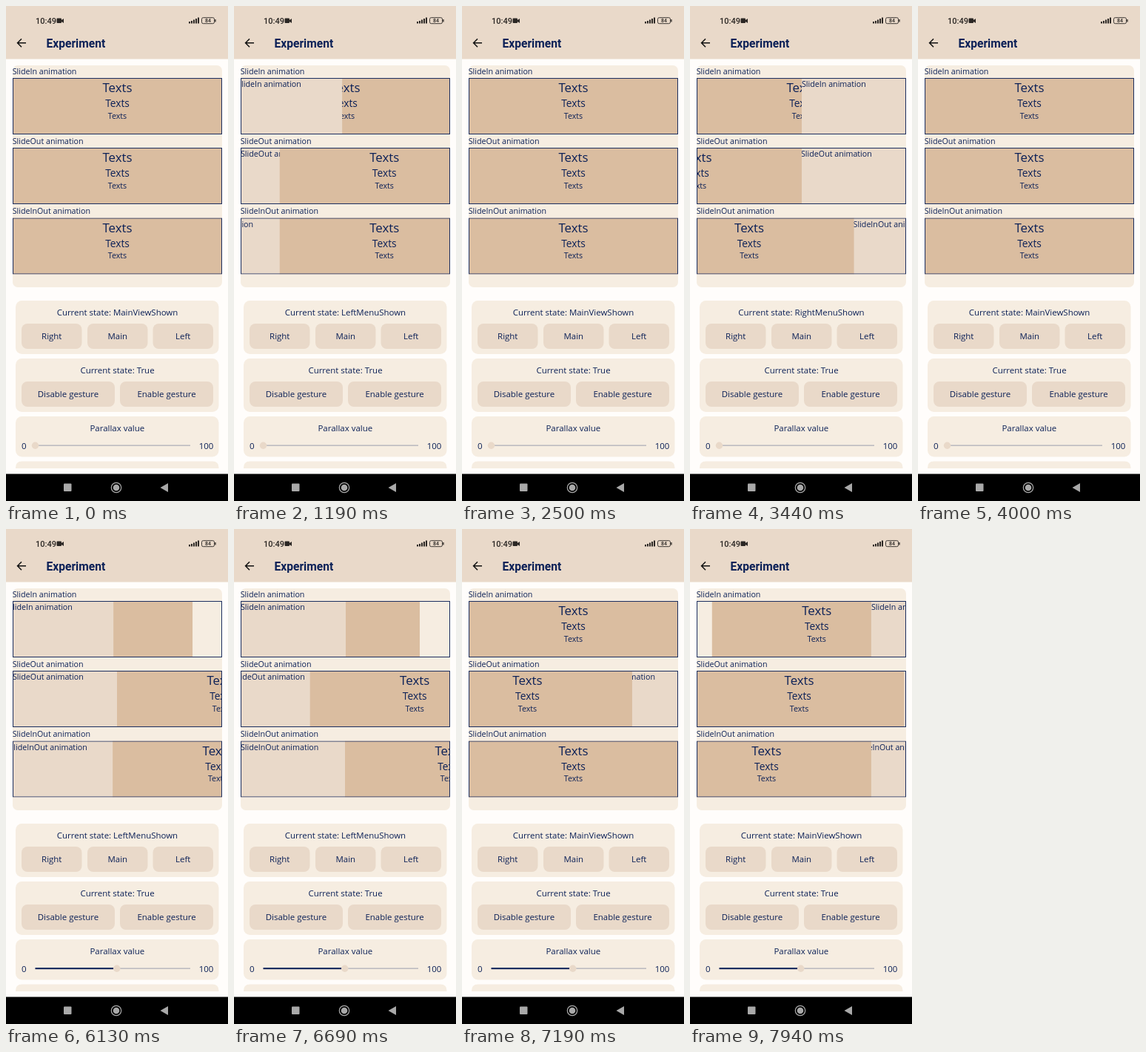
These frames come from a looping animation (300x667 px, 8 s). An HTML page:

```html
<!DOCTYPE html>
<html lang="en">
<head>
<meta charset="utf-8">
<title>Experiment</title>
<style>
  html, body { margin: 0; width: 100%; height: 100%; overflow: hidden; background: #fffdfb; }
  #stage { display: block; width: 300px; height: 667px; }
  text { font-family: "Open Sans", sans-serif; font-size: 11.46px; fill: #0b2057; }
  .mid { text-anchor: middle; }
  .small { font-size: 10.69px; }
  .medium { font-size: 13.75px; }
  .large { font-size: 16.9px; }
  .title { font: 600 15.6px Roboto, sans-serif; }
  .clock { font: 500 11px Roboto, sans-serif; fill: #2b2724; }
  .charge { font: 500 7px Roboto, sans-serif; fill: #2b2724; }
  .card { fill: #f6ede1; }
  .soft { fill: #e9d9c9; }
  .main { fill: #dabda0; }
  .edge { fill: none; stroke: #1c2f60; }
</style>
</head>
<body>
<svg id="stage" viewBox="0 0 300 667">
  <rect width="300" height="667" fill="#fffdfb"/>
  <rect class="soft" width="300" height="71.5"/>

  <text class="clock" x="40" y="23.5">10:49</text>
  <g fill="#2b2724">
    <rect x="68.5" y="16.5" width="6.5" height="6.5" rx="1"/>
    <path d="M75 19l3-2v6l-3-2z"/>
    <path d="M247 21h2v2.5h-2zM250 20h2v3.5h-2zM253 18.5h2v5h-2zM256 17h2v6.5h-2zM259 15.5h2v8h-2z"/>
    <rect x="282.3" y="18" width="1.3" height="3.5"/>
  </g>
  <rect x="264.5" y="15.7" width="17" height="8" rx="2" fill="none" stroke="#2b2724" stroke-width=".9"/>
  <text class="charge mid" x="273" y="22.3">84</text>

  <path d="M27 49.7H16M21 44.2l-5.5 5.5 5.5 5.5" fill="none" stroke="#111" stroke-width="1.5"/>
  <text class="title" x="54.5" y="56">Experiment</text>

  <rect class="card" x="9" y="80" width="283" height="299" rx="7"/>
  <g id="views"></g>

  <rect class="card" x="13" y="397" width="274.5" height="72" rx="8.5"/>
  <text class="mid" id="state" x="150.5" y="416.5"></text>
  <rect class="card" x="13" y="475" width="274.5" height="72" rx="8.5"/>
  <text class="mid" x="150.5" y="494.8">Current state: True</text>
  <g id="buttons"></g>

  <rect class="card" x="13" y="553" width="274.5" height="54.5" rx="8.5"/>
  <text class="mid" x="150.3" y="572.8">Parallax value</text>
  <text x="21" y="596.5">0</text>
  <text x="280.3" y="596.5" text-anchor="end">100</text>
  <rect x="39.5" y="591.4" width="209.5" height="1.6" fill="#bdbbc0"/>
  <rect id="fill" x="39.5" y="591.2" width="0" height="2" fill="#0b2057"/>
  <circle id="thumb" class="soft" cx="39.5" cy="592.2" r="4.7"/>
  <path class="card" d="M13 623v-1q0-8.5 8.5-8.5h257.500q8.500 0 8.500 8.500v1z"/>

  <rect y="630.5" width="300" height="36.500"/>
  <g fill="#a9a9a9">
    <rect x="78" y="643.500" width="10.500" height="10.500" rx="1"/>
    <circle cx="149" cy="649" r="4.300"/>
    <circle cx="149" cy="649" r="6.700" fill="none" stroke="#a9a9a9" stroke-width="1.200"/>
    <path d="M208.500 649l10.500-6v12z"/>
  </g>
</svg>
<script>
const NS = 'http://www.w3.org/2000/svg';
const LOOP = 8000, WIDTH = 282, MENU = 141;
const $ = id => document.getElementById(id);

function add(parent, tag, attrs, text) {
  const el = document.createElementNS(NS, tag);
  for (const k in attrs) el.setAttribute(k, attrs[k]);
  if (text) el.textContent = text;
  parent.appendChild(el);
  return el;
}

// Side menu views
function makeMenu(box, label) {
  const g = add(box, 'g', {});
  add(g, 'rect', { class: 'soft', width: MENU + 1, height: 76 });
  add(g, 'text', { class: 'small', x: 0, y: 12 }, label);
  return g;
}

function makeMain(box) {
  const g = add(box, 'g', {});
  add(g, 'rect', { class: 'main', width: WIDTH + 1, height: 76 });
  [['large', 19], ['medium', 39], ['small', 54.5]].forEach(([size, y]) =>
    add(g, 'text', { class: 'mid ' + size, x: 141.5, y }, 'Texts'));
  return g;
}

function makeView(name, y, menusOnTop) {
  const label = name + ' animation';
  add($('views'), 'text', { class: 'small', x: 8.7, y: y - 5.2 }, label);
  const box = add($('views'), 'svg', { x: 9, y, width: 283, height: 76, overflow: 'hidden' });
  let main;
  if (menusOnTop) main = makeMain(box);
  const left = makeMenu(box, label), right = makeMenu(box, label);
  if (!menusOnTop) main = makeMain(box);
  add(box, 'rect', { class: 'edge', x: .5, y: .5, width: 282, height: 75 });
  return { main, left, right };
}

const slideIn = makeView('SlideIn', 97, true);
const slideOut = makeView('SlideOut', 191, false);
const slideInOut = makeView('SlideInOut', 285.5, false);

[['Right', 21, 428, 81.5], ['Main', 110, 428, 81.5], ['Left', 198.5, 428, 81.5],
 ['Disable gesture', 21, 506, 126], ['Enable gesture', 154, 506, 126]].forEach(([label, x, y, w]) => {
  add($('buttons'), 'rect', { class: 'soft', x, y, width: w, height: 34, rx: 8 });
  add($('buttons'), 'text', { class: 'mid', x: x + w / 2, y: y + 21 }, label);
});

// Motion: each move is [start, end, to, ease]; positive shows the left menu
const line = p => p;
const smooth = p => p * p * (3 - 2 * p);
const sinOut = p => Math.sin(p * Math.PI / 2);

const moves = {
  slideIn: [
    [880, 1230, MENU, smooth], [1700, 2020, 0, smooth],
    [2760, 3000, -MENU, sinOut], [3470, 3720, 0, sinOut],
    [5927, 6177, MENU, sinOut], [6720, 6970, 0, sinOut],
    [7200, 7390, -MENU, sinOut], [7825, 8075, 0, sinOut]
  ],
  slideOut: [
    [1130, 1380, MENU, sinOut], [1890, 2140, 0, sinOut],
    [2760, 3000, -MENU, sinOut], [3470, 3720, 0, sinOut],
    [5550, 5950, MENU, smooth], [6590, 6850, 0, smooth],
    [7080, 7190, -61, line], [7190, 7310, -MENU, sinOut],
    [7590, 7940, -3, smooth], [7940, 7990, 0, line]
  ],
  slideInOut: [
    [1130, 1380, MENU, sinOut], [1890, 2140, 0, sinOut],
    [2650, 2900, -MENU, smooth], [3360, 3440, -71, line], [3440, 3640, 0, sinOut],
    [5927, 6177, MENU, sinOut], [6720, 6970, 0, sinOut],
    [7200, 7390, -MENU, sinOut], [7825, 8075, 0, sinOut]
  ],
  slider: [[4800, 5130, .5, smooth]]
};

const states = [[0, 'MainViewShown'], [1130, 'LeftMenuShown'], [1890, 'MainViewShown'],
  [2760, 'RightMenuShown'], [3470, 'MainViewShown'], [5927, 'LeftMenuShown'],
  [6720, 'MainViewShown'], [7200, 'RightMenuShown'], [7825, 'MainViewShown']];

function valueAt(list, t) {
  let v = 0;
  for (const [start, end, to, ease] of list) {
    if (t < start) break;
    v += (to - v) * ease(Math.min(1, (t - start) / (end - start)));
  }
  return v;
}

function place(view, main, left, right) {
  view.main.setAttribute('transform', `translate(${main})`);
  view.left.setAttribute('transform', `translate(${left})`);
  view.right.setAttribute('transform', `translate(${right})`);
}

function draw(t) {
  const value = valueAt(moves.slider, t), k = value * 2;

  let x = valueAt(moves.slideIn, t);
  const shift = -Math.sign(x) * 41 * k * Math.pow(Math.abs(x) / MENU, .62);
  place(slideIn, shift, Math.max(x, 0) - MENU, WIDTH + 1 + Math.min(x, 0));

  x = valueAt(moves.slideOut, t);
  let lag = 27 * k * (1 - Math.abs(x) / MENU);
  place(slideOut, x, -lag, MENU + lag);

  x = valueAt(moves.slideInOut, t);
  lag = 32 * k * (1 - Math.abs(x) / MENU);
  place(slideInOut, x, x - MENU + lag, WIDTH + x - lag);

  const pressed = t >= 4800 && t < 5380;
  $('fill').setAttribute('width', 209.5 * value + (value ? 1 : 0));
  $('thumb').setAttribute('cx', 39.5 + 220.5 * value);
  $('thumb').setAttribute('r', pressed ? 7 : 4.7);

  const state = 'Current state: ' + states.filter(s => s[0] <= t).pop()[1];
  if ($('state').textContent !== state) $('state').textContent = state;
}

const begin = performance.now();
function tick() {
  draw((performance.now() - begin) % LOOP);
  requestAnimationFrame(tick);
}
draw(0);
requestAnimationFrame(tick);
</script>
</body>
</html>
```
